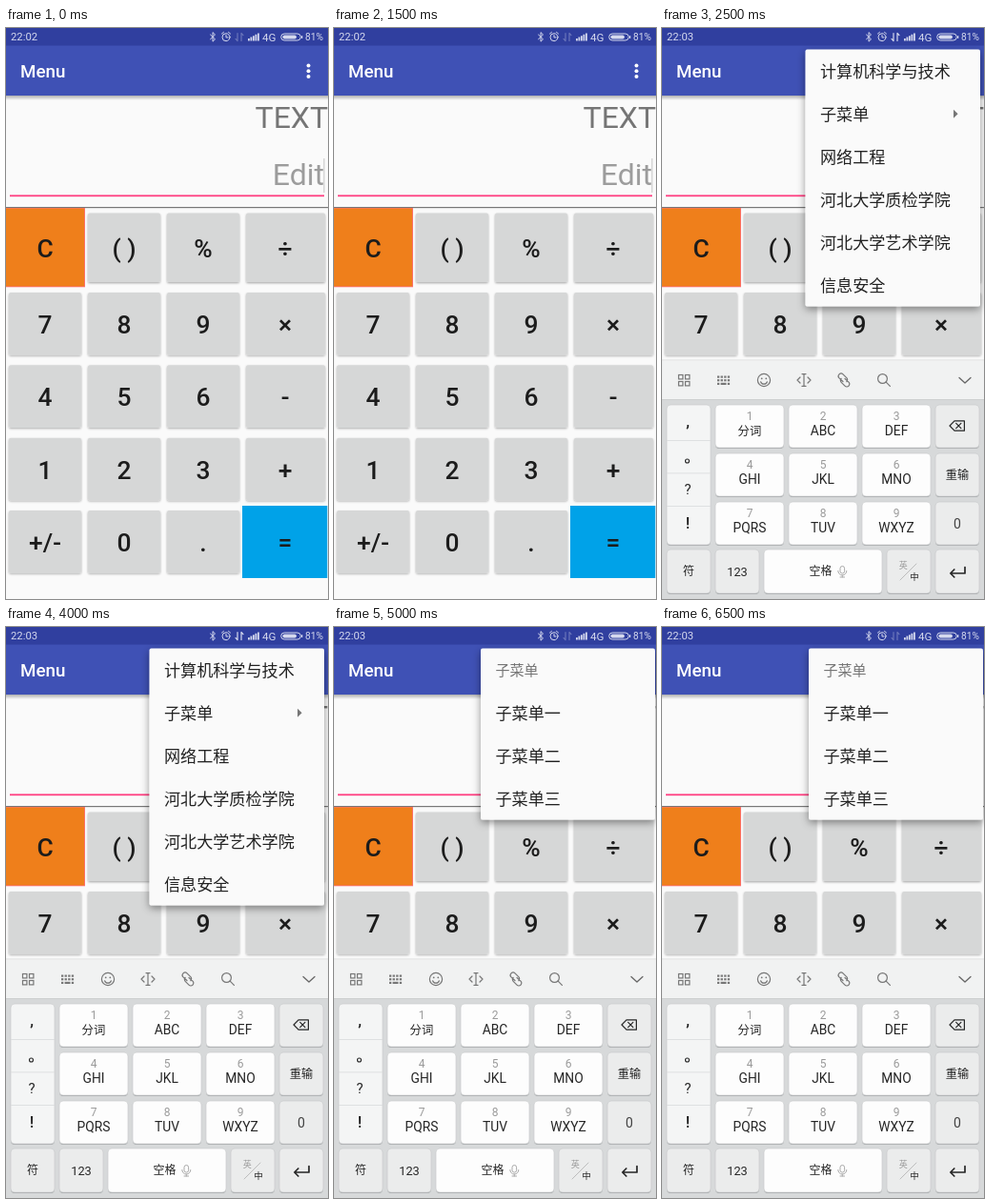
An HTML page that plays this animation: 338 by 600 pixels, repeating every 7.5 s.

```html
<!DOCTYPE html>
<html lang="zh-CN">
<head>
<meta charset="utf-8">
<title>Menu</title>
<style>
  html, body { margin: 0; width: 100%; height: 100%; overflow: hidden; background: #fafafa; }
  svg { display: block; width: 100vw; height: 100vh; }
  text { font-family: Roboto, "Noto Sans CJK SC", "Noto Sans CJK", sans-serif; }
  .mid { text-anchor: middle; }
  .line { fill: none; stroke-linecap: round; stroke-linejoin: round; }
</style>
</head>
<body>
<svg id="stage" viewBox="0 0 338 600" xmlns="http://www.w3.org/2000/svg">
  <defs>
    <linearGradient id="fade" x1="0" y1="0" x2="0" y2="1">
      <stop offset="0" stop-color="#000" stop-opacity=".3"/>
      <stop offset="1" stop-color="#000" stop-opacity="0"/>
    </linearGradient>
    <filter id="raised" x="-10%" y="-10%" width="120%" height="130%">
      <feDropShadow dx="0" dy="1.2" stdDeviation="1" flood-opacity=".32"/>
    </filter>
    <filter id="floating" x="-10%" y="-10%" width="120%" height="125%">
      <feDropShadow dx="0" dy="3" stdDeviation="4" flood-opacity=".42"/>
    </filter>
  </defs>

  <rect width="338" height="600" fill="#fafafa"/>
  <g id="display">
    <text x="338" y="105" font-size="32" fill="#757575" text-anchor="end">TEXT</text>
    <text x="334" y="165" font-size="32" fill="#9c9c9c" text-anchor="end">Edit</text>
    <rect id="caret" x="333.4" y="137" width="1" height="36" fill="#c4c4c4"/>
    <rect x="4" y="175.4" width="330" height="1.8" fill="#ff4081"/>
    <rect y="188" width="338" height="1.2" fill="#777"/>
  </g>
  <g id="pad"></g>

  <rect y="71" width="338" height="5" fill="url(#fade)"/>
  <rect y="18" width="338" height="53" fill="#3f51b5"/>
  <rect width="338" height="18.5" fill="#303f9f"/>
  <text x="15" y="52" font-size="18.8" font-weight="500" fill="#fff">Menu</text>
  <g fill="#fff">
    <circle cx="317.5" cy="39.5" r="2"/><circle cx="317.5" cy="45.2" r="2"/><circle cx="317.5" cy="50.9" r="2"/>
  </g>

  <g id="status" fill="#d5d9ee">
    <text id="clock" x="5" y="13.4" font-size="11.3">22:02</text>
    <path class="line" stroke="#d5d9ee" d="M214.5 7l5 4.8-2.5 2.4V4.6l2.5 2.4-5 4.8"/>
    <g class="line" stroke="#d5d9ee">
      <circle cx="231" cy="9.7" r="4"/>
      <path d="M231 7.5v2.4h2M226.5 6l2-1.6M235.5 6l-2-1.6"/>
    </g>
    <path id="data" class="line" stroke="#d5d9ee" stroke-width="1.2" d="M243 5.5v8M241 11.4l2 2.1M247 13.5v-8M249 7.6l-2-2.1"/>
    <path d="M254 11h1.8v2.5h-1.8zM256.5 9.6h1.8v3.9h-1.8zM259 8.2h1.8v5.3H259zM261.5 6.8h1.8v6.7h-1.8zM264 5.4h1.8v8.1H264z"/>
    <text x="269" y="13.5" font-size="11.6">4G</text>
    <rect x="288.7" y="6" width="20.6" height="7" rx="3.5" fill="none" stroke="#d5d9ee"/>
    <rect x="290.4" y="7.6" width="14.5" height="3.8" rx="1.9"/>
    <rect x="310" y="8" width="1.3" height="3" rx=".6"/>
    <text x="314" y="13.3" font-size="10.2">81%</text>
  </g>

  <g id="keys"></g>
  <g id="mainMenu"></g>
  <g id="subMenu"></g>
</svg>
<script>
const $ = id => document.getElementById(id);

const rect = (x, y, w, h, fill, extra = '') =>
  `<rect x="${x}" y="${y}" width="${w}" height="${h}" fill="${fill}" ${extra}/>`;
const label = (x, y, size, str, fill = '#1c1c1c', extra = '') =>
  `<text x="${x}" y="${y}" font-size="${size}" fill="${fill}" ${extra}>${str}</text>`;
const mid = (x, y, size, str, fill, weight = 400) =>
  label(x, y, size, str, fill, `class="mid" font-weight="${weight}"`);
const stroke = (d, color = '#777', width = 1.2) =>
  `<path class="line" stroke="${color}" stroke-width="${width}" d="${d}"/>`;

function calculator() {
  const cols = [[3, 76, 41], [86, 76, 124], [169, 76, 207], [252, 83, 293]];
  const rows = [[194.5, 72.5, 241.3], [278, 65.5, 321], [354.3, 65.5, 397.4], [430.7, 65.5, 473.8], [507, 65.5, 550.2]];
  const names = [
    ['C', '( )', '%', '÷'], ['7', '8', '9', '×'], ['4', '5', '6', '-'],
    ['1', '2', '3', '+'], ['+/-', '0', '.', '=']
  ];
  let out = '';
  rows.forEach(([y, h, base], r) => cols.forEach(([x, w, cx], c) => {
    const name = names[r][c];
    if (name === 'C') out += rect(0, 189, 83, 83.3, '#ff6f7d') + rect(0, 189.5, 82.2, 82, '#ef7f1b');
    else if (name === '=') out += rect(248, 502, 89.3, 76, '#00a2e8');
    else out += rect(x, y, w, h, '#d6d7d7', 'rx="1.8" filter="url(#raised)"');
    out += mid(cx, base, 26.4, name, '#1c1c1c', 500);
  }));
  return out;
}

function keyboard() {
  const ink = '#262626', soft = '#9a9a9a', white = '#fdfdfd', grey = '#ebecec';
  const key = (x, y, w, h, fill) =>
    rect(x, y + 1, w, h, '#a9acae', 'rx="4"') + rect(x, y, w, h, fill, 'rx="4" stroke="#c6c8c9" stroke-width=".6"');
  let out = rect(0, 349, 338, 41, '#f1f2f2') + rect(0, 348.5, 338, .8, '#dcdddd') +
    rect(0, 390, 338, 210, '#d7d9da') + rect(0, 390, 338, .8, '#cbcdce');

  // toolbar
  [[17.5, 364.5], [24.5, 364.5], [17.5, 371.5], [24.5, 371.5]].forEach(([x, y]) => {
    out += rect(x, y, 4.4, 4.4, 'none', 'stroke="#777" stroke-width="1.2"');
  });
  for (let r = 0; r < 2; r++)
    for (let c = 0; c < 4; c++) out += rect(58 + c * 3.6, 365.5 + r * 3.6, 2.3, 2.2, '#777');
  out += rect(58, 372.8, 2.3, 2.2, '#777') + rect(61.6, 372.8, 5.9, 2.2, '#777') + rect(68.8, 372.8, 2.3, 2.2, '#777');
  out += '<circle cx="107" cy="370" r="6.6" fill="none" stroke="#777" stroke-width="1.2"/>' +
    '<circle cx="104.7" cy="368.3" r=".9" fill="#777"/><circle cx="109.3" cy="368.3" r=".9" fill="#777"/>';
  out += stroke('M103.6 371.8a3.6 3.6 0 0 0 6.8 0') +
    stroke('M149 364v12M147 363.6h4M147 376.4h4M145 367l-3 3 3 3M153 367l3 3-3 3') +
    stroke('M190 371.5l-4-3.6a2.8 2.8 0 0 1 4-4l3.8 3.8a2.8 2.8 0 0 1 0 4M192 368.5l4 3.6a2.8 2.8 0 0 1-4 4l-3.8-3.8a2.8 2.8 0 0 1 0-4') +
    '<circle cx="231.5" cy="368.5" r="4.9" fill="none" stroke="#777" stroke-width="1.2"/>' +
    stroke('M235.2 372.2l4.2 4.2') + stroke('M312 367.5l6 5.5 6-5.5', '#666', 1.3);

  // punctuation column
  out += key(5, 396, 46, 147, '#f4f5f5');
  [433, 467.5, 502].forEach(y => out += rect(5, y, 46, .8, '#d9dbdc'));
  out += mid(27, 419, 17, ',', ink, 500) +
    '<circle cx="26.5" cy="455" r="2" fill="none" stroke="#262626" stroke-width="1.1"/>' +
    mid(27, 490, 15, '?', ink) + mid(27, 526, 17, '!', ink, 500);

  // letter keys
  ['分词', 'ABC', 'DEF', 'GHI', 'JKL', 'MNO', 'PQRS', 'TUV', 'WXYZ'].forEach((name, i) => {
    const x = 56 + i % 3 * 77, y = 396 + (i / 3 | 0) * 51;
    out += key(x, y, 72, 45, white) + mid(x + 36, y + 15.5, 12, i + 1, soft) +
      mid(x + 36, y + 31.5, i ? 13.8 : 12.4, name, ink);
  });

  // right column
  [396, 447, 498].forEach(y => out += key(287, y, 46, 45, grey));
  out += stroke('M307 412.8h10.4v10.4H307l-5-5.2zM308.7 415.4l5.2 5.2M313.9 415.4l-5.2 5.2', ink) +
    mid(310, 473.6, 12.2, '重输', ink, 500) + mid(310, 525.5, 14, '0', '#444');

  // bottom row
  out += key(5, 548, 46, 46, grey) + key(56, 548, 46, 46, grey) + key(107, 548, 124, 46, white) +
    key(236, 548, 46, 46, grey) + key(287, 548, 46, 46, grey);
  out += mid(28, 575.2, 12, '符', ink) + mid(79, 575.5, 12.8, '123', ink) + mid(166.5, 575, 12, '空格', ink) +
    mid(253.3, 567.5, 9, '英', soft) + mid(265, 579.5, 9.5, '中', ink, 500) +
    stroke('M250 580l17-17', '#b0b0b0', .8) +
    rect(187, 565.5, 4.6, 7.6, 'none', 'rx="2.3" stroke="#aaa"') +
    stroke('M184.8 570.5a4.5 4.5 0 0 0 9 0M189.3 575v2M187 577h4.6', '#aaa', 1) +
    stroke('M318 566.5v6.5h-15M306.8 569l-4 4 4 4', ink, 1.7);
  return out;
}

function popup(x, w, h, names, title) {
  let out = rect(x, 22.5, w, h, '#fafafa', 'rx="2" filter="url(#floating)"');
  names.forEach((name, i) => {
    const head = title && !i;
    out += label(x + 15.5, 51.9 + i * 45 - (head ? 1 : 0), head ? 15 : 17.1, name, head ? '#757575' : '#222');
  });
  return out;
}

$('pad').innerHTML = calculator();
$('keys').innerHTML = keyboard();
$('mainMenu').innerHTML = popup(150.5, 183.5, 270,
  ['计算机科学与技术', '子菜单', '网络工程', '河北大学质检学院', '河北大学艺术学院', '信息安全']) +
  '<path d="M306 85.8l4.6 4.5-4.6 4.5z" fill="#757575"/>';
$('subMenu').innerHTML = popup(154, 183, 180, ['子菜单', '子菜单一', '子菜单二', '子菜单三'], true);

const show = (id, on) => $(id).setAttribute('visibility', on ? 'visible' : 'hidden');
let last = -1;

function render(ms) {
  const step = Math.floor(ms % 7500 / 2500);
  if (step === last) return;
  last = step;
  show('caret', step === 0);
  show('keys', step > 0);
  show('mainMenu', step === 1);
  show('subMenu', step === 2);
  $('clock').textContent = step ? '22:03' : '22:02';
  $('data').setAttribute('opacity', step === 1 ? 1 : .35);
}

const start = performance.now();
function tick() {
  render(performance.now() - start);
  requestAnimationFrame(tick);
}
tick();
</script>
</body>
</html>
```
